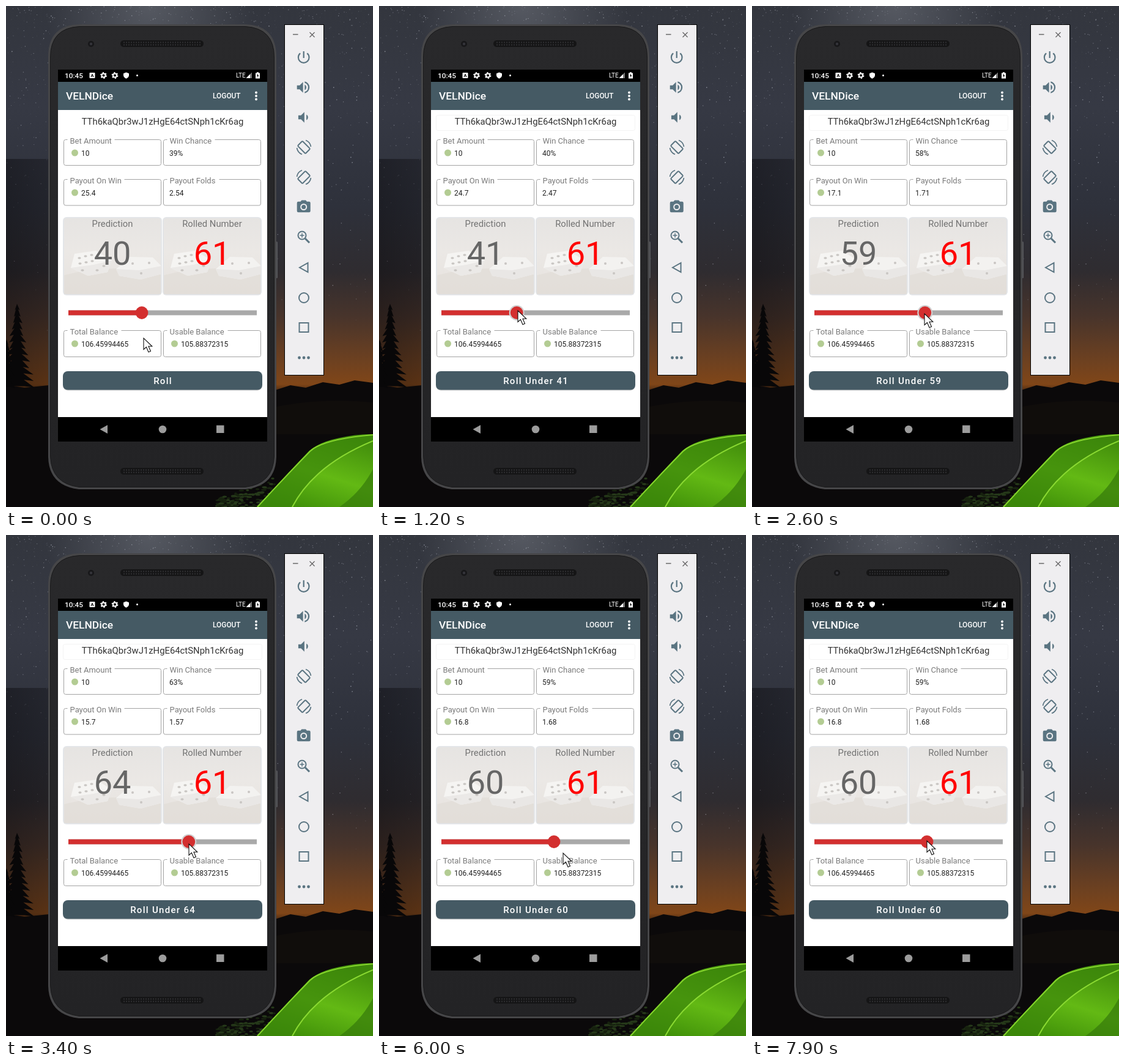
Write an HTML page that moves like this. It is 600 px wide and 819 px high and loops after 8 s.

```html
<!DOCTYPE html>
<html lang="en">
<head>
<meta charset="utf-8">
<title>Dice roll</title>
<style>
  html, body { margin: 0; width: 100%; height: 100%; overflow: hidden; background: #0a0809; }
  svg { display: block; width: 100vw; height: 100vh; font-family: Roboto, sans-serif; }
  .icon { fill: #5a7481; }
  .line { fill: none; stroke: #5a7481; stroke-width: 2; }
  .label { font-size: 13px; fill: #7b7b7b; }
  .value { font-size: 12px; fill: #222; }
  .head { font-size: 14.8px; fill: #737373; text-anchor: middle; }
  .big { font-size: 54px; text-anchor: middle; }
  .bold { font-weight: 500; fill: #fff; }
</style>
</head>
<body>
<svg id="stage" viewBox="0 0 600 819"></svg>
<script>
let seed = 7;
const rnd = () => (seed = seed * 16807 % 2147483647) / 2147483647;
const $ = id => document.getElementById(id);

function stars(n) {
  let out = '';
  for (let i = 0; i < n; i++) {
    const y = rnd() * rnd() * 560, x = rnd() * 600;
    out += `<circle cx="${x.toFixed(1)}" cy="${y.toFixed(1)}" r="${(.35 + rnd() * .5).toFixed(2)}" opacity="${(.1 + rnd() * .4).toFixed(2)}"/>`;
  }
  return `<g fill="#dfe3ee">${out}</g>`;
}

function pine(cx, top, layers, step, spread) {
  let left = '', right = '';
  for (let i = 1; i <= layers; i++) {
    const y = top + i * step, w = 2 + i * spread;
    right += `L${cx + w * (.8 + rnd() * .4)} ${y}L${cx + w * .45} ${y - 2}`;
    left = `L${cx - w * .45} ${y - 2}L${cx - w * (.8 + rnd() * .4)} ${y}` + left;
  }
  return `<path fill="#080708" d="M${cx} ${top}${right}${left}Z"/>`;
}

function bush() {
  let out = '';
  for (let i = 0; i < 130; i++) {
    const x = 345 + rnd() * 95, y = 819 - rnd() * (12 + (x - 345) * .4);
    out += `<ellipse cx="${x}" cy="${y}" rx="${2 + rnd() * 3}" ry="1.6" fill="${rnd() < .5 ? '#26391a' : '#17220f'}"/>`;
  }
  return out;
}

const coin = (x, y) => `<circle cx="${x}" cy="${y}" r="5.5" fill="#b3cc93"/>`;

// Outlined text field with a gap in the top border for its label
function field(x, y, h, label, gap, id, value, hasCoin) {
  const r = x + 159, b = y + h;
  return `<path fill="none" stroke="#a3a3a3" d="M${x + 6} ${y}H${x + 3}Q${x} ${y} ${x} ${y + 3}V${b - 3}Q${x} ${b} ${x + 3} ${b}H${r - 3}Q${r} ${b} ${r} ${b - 3}V${y + 3}Q${r} ${y} ${r - 3} ${y}H${x + 14 + gap}"/>
    <text class="label" x="${x + 10}" y="${y + 6}">${label}</text>
    ${hasCoin ? coin(x + 18, y + 21.5) : ''}
    <text class="value" id="${id}" x="${x + (hasCoin ? 28.5 : 9.5)}" y="${y + 26}">${value}</text>`;
}

function card(x, title) {
  const pips = [[120, 412], [130, 409], [140, 407], [121, 421], [131, 419], [141, 417], [125, 432], [149, 432], [160, 425]];
  return `<g transform="translate(${x})">
    <rect x="93" y="345" width="162" height="128" rx="6" fill="#e3e5e8"/>
    <rect x="95" y="347" width="158" height="124" rx="4" fill="url(#card)"/>
    <path d="M95 440Q170 420 253 436V471H95Z" fill="#e2ddd8" opacity=".7"/>
    <path d="M112 405L147 400L173 416L166 435L134 441L106 428Z" fill="#f5f4f2"/>
    <path d="M106 428L143 423L173 416L166 435L134 441Z" fill="#ebe9e7"/>
    <path d="M180 430L203 410L240 411L254 425V438L220 447L185 441Z" fill="#f3f2f0"/>
    <path d="M180 430L218 432L254 425V438L220 447L185 441Z" fill="#e9e7e5"/>
    <g fill="#c9c6c3">${pips.map(([a, b]) => `<ellipse cx="${a}" cy="${b}" rx="2.6" ry="1.7"/>`).join('')}
      <circle cx="207" cy="421" r="2"/><circle cx="234" cy="420" r="2"/><circle cx="221" cy="437" r="2"/></g>
    <text class="head" x="174" y="361">${title}</text></g>`;
}

const gear = x => `<g fill="none" stroke="#fff"><circle cx="${x}" cy="113.5" r="3" stroke-width="2"/><circle cx="${x}" cy="113.5" r="4.6" stroke-width="1.6" stroke-dasharray="2.4 2.42"/></g>`;
const icon = (y, d) => `<path class="icon" fill-rule="evenodd" transform="translate(473.5 ${y - 13.2}) scale(1.1)" d="${d}"/>`;
const turn = (y, flip) => `<g class="line" transform="translate(487 ${y}) scale(${flip} 1)">
  <rect x="-5.5" y="-9" width="11" height="18" rx="1.5" transform="rotate(-45)"/>
  <path d="M3 -11.5Q10 -9 11.5 -1M-3 11.5Q-10 9 -11.5 1" stroke-width="1.7"/></g>`;
const grille = y => `<rect x="187" y="${y}" width="136" height="11" rx="5.5" fill="#151516"/>
  <path d="M192 ${y + 3.5}H319M192 ${y + 7.5}H319" stroke="#303032" stroke-width="2" stroke-dasharray="2 2"/>`;

const sky = `
  <defs>
    <linearGradient id="sky" x2="0" y2="1">
      <stop stop-color="#33363e"/><stop offset=".2" stop-color="#363944"/><stop offset=".4" stop-color="#2e313b"/>
      <stop offset=".53" stop-color="#2f2c30"/><stop offset=".62" stop-color="#48342b"/><stop offset=".71" stop-color="#6e4120"/>
      <stop offset=".755" stop-color="#804618"/><stop offset=".78" stop-color="#22150e"/><stop offset=".82" stop-color="#0a0809"/>
    </linearGradient>
    <radialGradient id="glow" gradientUnits="userSpaceOnUse" cx="235" cy="0" r="170">
      <stop stop-color="#777b84" stop-opacity=".5"/><stop offset="1" stop-color="#777b84" stop-opacity="0"/>
    </radialGradient>
    <linearGradient id="dusk"><stop stop-color="#08070a" stop-opacity=".45"/><stop offset=".13" stop-color="#08070a" stop-opacity=".3"/><stop offset=".75" stop-color="#08070a" stop-opacity="0"/></linearGradient>
    <linearGradient id="tent" x1=".2" y1="1" x2=".7"><stop stop-color="#3c8c08"/><stop offset=".5" stop-color="#63b914"/><stop offset="1" stop-color="#438f0c"/></linearGradient>
    <linearGradient id="card" x2="0" y2="1"><stop stop-color="#e6e4e2"/><stop offset=".45" stop-color="#ebe8e5"/><stop offset="1" stop-color="#e6e2de"/></linearGradient>
    <linearGradient id="body" x2="0" y2="1"><stop stop-color="#29292b"/><stop offset="1" stop-color="#232325"/></linearGradient>
  </defs>
  <rect width="600" height="819" fill="url(#sky)"/>
  <rect width="600" height="200" fill="url(#glow)"/>
  ${stars(1100)}
  <rect y="250" width="600" height="400" fill="url(#dusk)"/>
  <path d="M0 619L30 624L70 620L440 628L465 620L490 624L518 615L545 619L570 612L600 616V819H0Z" fill="#0b090a"/>
  <path d="M442 655Q520 640 600 648V700H442Z" fill="#15100d" opacity=".6"/>
  ${pine(18, 487, 13, 10.5, 1.9)}${pine(1, 545, 8, 10, 1.6)}
  ${bush()}
  <path d="M410 819Q455 770 496 727Q512 713 545 706Q575 699 600 700V819Z" fill="url(#tent)"/>
  <path d="M468 819Q503 751 600 711V700Q530 704 496 727L410 819Z" fill="#3b850b" opacity=".7"/>
  <path d="M468 819Q503 751 600 711" fill="none" stroke="#8bda32" stroke-width="2"/>
  <path d="M411 819Q455 771 497 728Q518 708 600 701" fill="none" stroke="#85d42c" stroke-width="2"/>
  <path d="M545 819Q580 795 600 757V819Z" fill="#367a0b" opacity=".7"/>`;

const phone = `
  <rect x="440" y="385" width="4" height="60" rx="1.5" fill="#55565a"/>
  <path id="shell" d="M119 30H392Q442 32 442 83V737Q441 784 392 790H119Q70 784 69 737V83Q69 32 119 30Z" fill="#464648"/>
  <path d="M120 33.5H391Q438.500 36 438.500 84V736Q437 781 391 786.500H120Q74 781 72.500 736V84Q72.500 36 120 33.500Z" fill="url(#body)" stroke="#19191a"/>
  <circle cx="139" cy="62" r="5" fill="#18181a"/><circle cx="139" cy="62" r="2.2" fill="#34343a"/>
  ${grille(56)}${grille(755)}
  <rect x="85" y="104" width="342" height="608"/>
  <rect x="85" y="170" width="342" height="502" fill="#fff"/>
  <rect x="85" y="124" width="342" height="46" fill="#455a64"/>
  <text class="bold" x="96" y="117.500" font-size="11.8">10:45</text>
  <rect x="136.500" y="109" width="9" height="9" rx="1" fill="#fff"/>
  <text x="141" y="116.300" font-size="7.500" font-weight="700" text-anchor="middle">A</text>
  ${gear(159.5)}${gear(178)}
  <path d="M196.500 108.500L201 110.200V113.500Q200.500 117 196.500 118.700Q192.500 117 192 113.500V110.200Z" fill="#fff"/>
  <circle cx="214.500" cy="113.500" r="1.5" fill="#fff"/>
  <text x="376" y="117" font-size="10" fill="#fff">LTE</text>
  <path d="M402 108.500V118H392.500Z" fill="#777"/><path d="M399 111.500V118H392.500Z" fill="#fff"/>
  <path d="M408 109.500H410V108.300H413V109.500H415V118.500H408Z" fill="#fff"/><path d="M412 110.500L410 114.300H411.300V117L413.300 113.300H412Z"/>
  <text class="bold" x="98" y="153" font-size="17.4">VELNDice</text>
  <text class="bold" x="338" y="151" font-size="11.9">LOGOUT</text>
  <g fill="#fff"><circle cx="409" cy="141.500" r="1.9"/><circle cx="409" cy="147" r="1.9"/><circle cx="409" cy="152.500" r="1.9"/></g>
  <rect id="faint" x="93.500" y="178.500" width="325" height="25" rx="3" fill="none" stroke="#f3f3f3"/>
  <text x="256" y="194" font-size="14.85" fill="#333" text-anchor="middle">TTh6kaQbr3wJ1zHgE64ctSNph1cKr6ag</text>
  ${field(94.5, 218.5, 42, 'Bet Amount', 69, 'bet', '10', true)}
  ${field(257.5, 218.5, 42, 'Win Chance', 70, 'chance', '', false)}
  ${field(94.5, 283.5, 42.5, 'Payout On Win', 85, 'payout', '', true)}
  ${field(257.5, 283.5, 42.5, 'Payout Folds', 77, 'folds', '', false)}
  ${card(0, 'Prediction')}${card(163, 'Rolled Number')}
  <text class="big" id="pick" x="174" y="423" fill="#666"></text>
  <text class="big" x="337" y="423" fill="#f00">61</text>
  <rect x="102" y="497.500" width="308" height="8" fill="#a9a9a9"/>
  <rect id="bar" x="102" y="497.500" height="8" fill="#d32f2f"/>
  ${field(94.5, 530.5, 43, 'Total Balance', 80, 'total', '106.45994465', true)}
  ${field(257.5, 530.5, 43, 'Usable Balance', 91, 'usable', '105.88372315', true)}
  <g id="thumb"><circle id="halo" r="12.500" fill="#d0d0d0"/><circle r="10.400" fill="#d32f2f"/></g>
  <rect x="93" y="598.500" width="326" height="30" rx="8" fill="#000" opacity=".22"/>
  <rect x="93" y="597" width="326" height="30.500" rx="8" fill="#455a64"/>
  <text class="bold" id="roll" x="256.600" y="618" font-size="15" letter-spacing="1.3" text-anchor="middle"></text>
  <g fill="#9c9c9c"><path d="M153.500 692L166 685V699Z"/><circle cx="256" cy="692" r="6.300"/><rect x="344" y="685.500" width="12.500" height="12.500"/></g>`;

const panel = `
  <rect x="455.500" y="30.500" width="64" height="573" fill="#efeef0" stroke="#000"/>
  <path d="M469 46.500H477.500M496.500 43L504.500 51M504.500 43L496.500 51" stroke="#666" stroke-width="1.3"/>
  ${icon(84, 'M13 3h-2v10h2V3zM17.830 5.170l-1.420 1.420A6.920 6.920 0 0 1 19 12a7 7 0 1 1-11.410-5.410L6.170 5.170A8.930 8.930 0 0 0 3 12a9 9 0 1 0 18 0c0-2.740-1.230-5.180-3.170-6.830z')}
  ${icon(133, 'M2 9v6h4l5 5V4L6 9zM16 12A4.500 4.500 0 0 0 13.500 8v8A4.500 4.500 0 0 0 16 12zM13.500 3.200v2.100a7 7 0 0 1 0 13.400v2.100a9 9 0 0 0 0-17.600z')}
  ${icon(182, 'M18.500 12A4.500 4.500 0 0 0 16 8v8A4.500 4.500 0 0 0 18.500 12zM4 9v6h4l5 5V4L8 9z')}
  ${turn(231, 1)}${turn(280, -1)}
  ${icon(328.5, 'M9 2L7.200 4H4a2 2 0 0 0-2 2v12a2 2 0 0 0 2 2h16a2 2 0 0 0 2-2V6a2 2 0 0 0-2-2h-3.200L15 2zM12 7a5 5 0 1 1 0 10a5 5 0 1 1 0-10zM12 8.800a3.200 3.200 0 1 0 0 6.400a3.200 3.200 0 1 0 0-6.400z')}
  <g class="line"><circle cx="484" cy="375" r="6.500"/><path d="M489 380L496 387" stroke-width="3"/><path d="M480.500 375H487.500M484 371.500V378.500" stroke-width="1.500"/>
    <path d="M480 427.500L493.500 420V435Z"/><circle cx="487" cy="477" r="8"/><rect x="479.500" y="518" width="15" height="15"/></g>
  <g class="icon"><circle cx="479.500" cy="575" r="2.400"/><circle cx="487" cy="575" r="2.400"/><circle cx="494.500" cy="575" r="2.400"/></g>`;

$('stage').innerHTML = sky + phone + panel +
  '<path id="pointer" d="M0 0V18.500L4.400 14.500L8 22.800L11.500 21.300L8 13.300H13.800Z" fill="#fff" stroke="#111" stroke-width="1.100"/>';

// time, chosen number, pointer x, pointer y
const keys = [
  [0, 40, 225, 543], [300, 40, 227, 500], [800, 40, 227, 500], [1200, 41, 227, 498], [1300, 41, 227, 498],
  [1900, 51, 258, 501], [2200, 55, 270, 502], [2300, 55, 270, 502], [3100, 65, 301, 504], [3300, 65, 301, 504],
  [3400, 64, 299, 505], [3900, 60, 287, 506], [4200, 60, 287, 506], [4300, 60, 286, 506], [5900, 60, 286, 506],
  [6300, 60, 346, 560], [6700, 60, 281, 612], [6900, 60, 281, 612], [7300, 60, 272, 560], [7600, 60, 285, 498],
  [7800, 60, 285, 498], [7900, 60, 286, 500], [8000, 60, 286, 500]
];

function pose(t) {
  const i = keys.findIndex(k => k[0] > t), a = keys[i - 1], b = keys[i];
  const p = (t - a[0]) / (b[0] - a[0]);
  return a.map((v, j) => v + (b[j] - v) * p);
}

function draw(now) {
  const t = Math.floor(now % 8000 / 100) * 100;
  const [, raw, x, y] = pose(t);
  const n = Math.round(raw), chance = n - 1, at = 222 + (n - 40) * 3.2;
  const folds = +(99 / chance - 1e-4).toFixed(2);
  $('chance').textContent = chance + '%';
  $('folds').textContent = folds;
  $('payout').textContent = +(folds * 10).toFixed(1);
  $('pick').textContent = n;
  $('roll').textContent = n > 40 ? 'Roll Under ' + n : 'Roll';
  $('bar').setAttribute('width', at - 102);
  $('thumb').setAttribute('transform', `translate(${at} 501.5)`);
  $('halo').setAttribute('opacity', t < 900 || t >= 5600 ? 0 : t < 5400 ? 1 : .4);
  $('faint').setAttribute('opacity', t < 300 ? 0 : 1);
  $('pointer').setAttribute('transform', `translate(${Math.round(x)} ${Math.round(y)})`);
}

function loop() {
  draw(performance.now());
  requestAnimationFrame(loop);
}
loop();
</script>
</body>
</html>
```
